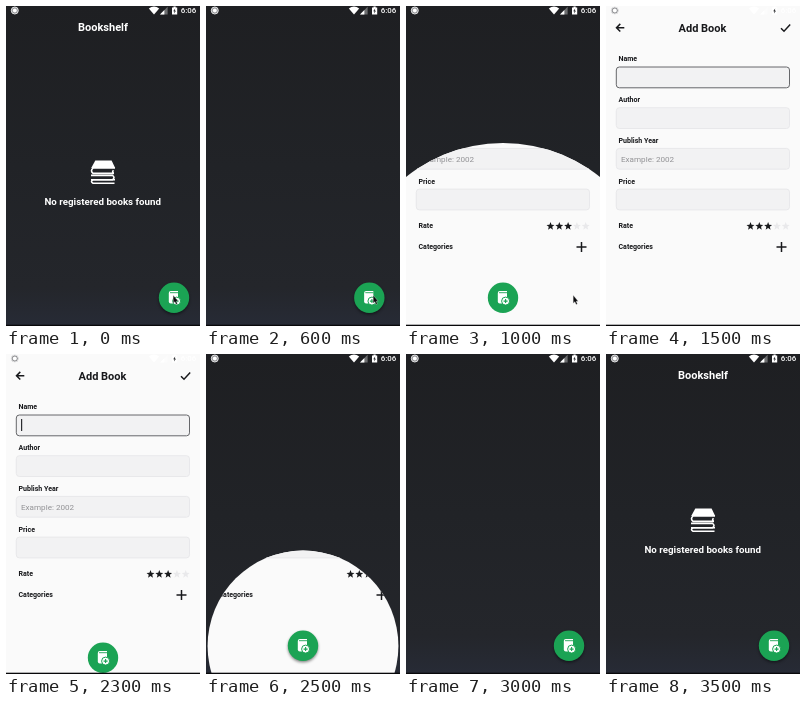
Recreate the animation shown at these times as an HTML page. Size 194 by 320 pixels, loop 3.8 s.

```html
<!DOCTYPE html>
<html lang="en">
<head>
<meta charset="utf-8">
<title>Bookshelf</title>
<style>
  html, body { margin: 0; width: 100%; height: 100%; overflow: hidden; background: #1f2023; }
  svg { display: block; width: 100vw; height: 100vh; }
  text { font-family: Roboto, "Noto Sans", sans-serif; }
  .title { font-size: 11px; font-weight: 700; text-anchor: middle; }
  .empty { font-size: 9.75px; font-weight: 700; text-anchor: middle; }
  .label { font-size: 7.05px; font-weight: 700; fill: #18191c; }
  .hint { font-size: 8.1px; fill: #929295; }
  .clock { font-size: 7.9px; font-weight: 500; fill: #fff; }
  .field { fill: #f2f2f3; stroke: #e5e5e7; stroke-width: .8; }
  .focus { stroke: #66676a; stroke-width: 1; }
  .line { fill: none; stroke: #18191c; stroke-width: 1.5; }
</style>
</head>
<body>
<svg viewBox="0 0 194 320" preserveAspectRatio="none">
  <defs>
    <linearGradient id="night" x2="0" y2="1">
      <stop offset="0" stop-color="#1e1f22"/>
      <stop offset=".5" stop-color="#212327"/>
      <stop offset=".88" stop-color="#24262b"/>
      <stop offset="1" stop-color="#272b36"/>
    </linearGradient>
    <filter id="blur" x="-50%" y="-50%" width="200%" height="200%">
      <feGaussianBlur stdDeviation="1.4"/>
    </filter>
    <clipPath id="reveal"><circle id="hole" cx="97" cy="292" r="0"/></clipPath>
  </defs>

  <rect width="194" height="320" fill="url(#night)"/>

  <g id="home" fill="#fff">
    <text class="title" x="97" y="25.3">Bookshelf</text>
    <path d="M89.3 154.5H105.6L109.2 162H85.2Z"/>
    <g fill="none" stroke="#fff" stroke-width="1.6">
      <path d="M109 162H87q-3 3 0 5.4H108"/>
      <path d="M107.5 164.2q-1.6 1.6 0 3.2"/>
      <path d="M85 169.4H106.5q3 2.2 0 4.4H85"/>
      <path d="M109 173.8H87q-3 1.8 0 3.4H108.5"/>
    </g>
    <text class="empty" x="96.7" y="199.3">No registered books found</text>
  </g>

  <g id="form" clip-path="url(#reveal)">
    <rect width="194" height="320" fill="#fafafa"/>
    <text class="title" x="96.5" y="25.7" fill="#18191c">Add Book</text>
    <path class="line" d="M18.3 21.7H10.8M14.3 17.9L10.5 21.7L14.3 25.5"/>
    <path class="line" d="M175 22.2L178 25.2L184.2 18.6"/>
    <g id="fields"></g>
    <text class="hint" x="15" y="155.8">Example: 2002</text>
    <text class="label" x="12.5" y="221.6">Rate</text>
    <g id="stars"></g>
    <text class="label" x="12.5" y="243.4">Categories</text>
    <path class="line" d="M170.5 241H180.5M175.5 236V246"/>
    <rect id="caret" x="15" y="65" width="1.2" height="12" fill="#2b2c2f"/>
  </g>

  <g id="fab">
    <circle id="shade" cy="1.6" r="15" fill="#000" opacity=".5" filter="url(#blur)"/>
    <circle r="15.2" fill="#1ba354"/>
    <path d="M-5.2 -4.8q0 -2 2 -2H4V5.8H-3.2q-2 0 -2 -2Z" fill="#fff"/>
    <path d="M-4 -5H4" stroke="#1ba354" stroke-width=".9"/>
    <circle cx="2.6" cy="3.4" r="4" fill="#fff" stroke="#1ba354" stroke-width="1"/>
    <path d="M.6 3.4H4.6M2.6 1.4V5.4" stroke="#1ba354" stroke-width="1.1"/>
  </g>

  <g fill="#fff">
    <circle cx="8.8" cy="4.5" r="3.5" fill="#8d8e91" stroke="#e4e4e5"/>
    <circle cx="8.8" cy="4.5" r="2" />
    <path d="M142.8 2.5Q148 -1.5 153.2 2.5L148 8.6Z"/>
    <path d="M154 8.5L161.6 .8V8.5Z" opacity=".35"/>
    <path d="M154 8.5L158.4 4V8.5Z"/>
    <path d="M166 1.5H167.5V.4H169.7V1.5H171.2V8.6H166Z"/>
    <path d="M169.2 2.4L167.2 5.2H168.5L168 7.6L170 4.7H168.8Z" fill="#1e1f22"/>
    <text class="clock" x="174.8" y="7.3">6:06</text>
  </g>

  <path id="cursor" d="M167.2 289.2V297.2L168.9 295.7L170.1 298.6L171.4 298L170.2 295.2H172.2Z"
        fill="#08080a" stroke="#e8e8e8" stroke-width=".35"/>
  <rect y="318.7" width="194" height="1.3" fill="#08080a"/>
</svg>
<script>
  const LOOP = 3800, STEP = 100;
  const $ = id => document.getElementById(id);
  const set = (id, name, value) => $(id).setAttribute(name, value);
  const span = (t, from, to) => Math.min(1, Math.max(0, (t - from) / (to - from)));
  const mix = (a, b, p) => a + (b - a) * p;
  const easeInOut = p => p < .5 ? 16 * p ** 5 : 1 - (2 - 2 * p) ** 5 / 2;
  const easeOut = p => 1 - (1 - p) ** 2.9;

  $('fields').innerHTML = ['Name', 'Author', 'Publish Year', 'Price'].map((name, i) => {
    const y = 55.4 + i * 40.7;
    return `<text class="label" x="12.5" y="${y}">${name}</text>
      <rect class="field ${i ? '' : 'focus'}" x="10.3" y="${y + 5.6}" width="173.2" height="20.8" rx="3"/>`;
  }).join('');

  function star(cx, cy, r) {
    const points = Array.from({ length: 10 }, (_, i) => {
      const a = i * Math.PI / 5, d = i % 2 ? r * .43 : r;
      return `${cx + d * Math.sin(a)},${cy - d * Math.cos(a)}`;
    });
    return points.join(' ');
  }

  $('stars').innerHTML = [0, 1, 2, 3, 4].map(i =>
    `<polygon points="${star(144.5 + i * 8.8, 220.3, 4.2)}" fill="${i < 3 ? '#18191c' : '#e9e9eb'}"/>`
  ).join('');

  function draw(t) {
    const leaving = t < 1900;
    const fade = leaving ? 1 - span(t, 0, 500) : span(t, 3000, 3200);
    const radius = leaving
      ? 310 * span(t, 800, 1200)
      : 310 * (1 - span(t, 2300, 2700)) ** 1.7;
    const x = leaving
      ? mix(168, 97, easeInOut(span(t, 500, 800)))
      : mix(97, 168, easeOut(span(t, 2700, 3200)));
    const drop = leaving ? span(t, 1200, 1500) ** 2 : (1 - span(t, 2200, 2400)) ** 2;
    const shade = leaving ? 1 - span(t, 800, 1000) : span(t, 2300, 2500);

    set('home', 'opacity', fade);
    set('hole', 'r', radius);
    set('form', 'visibility', radius > 0 ? 'visible' : 'hidden');
    set('fab', 'transform', `translate(${x} ${291.7 + 48 * drop})`);
    set('shade', 'opacity', .5 * shade);
    set('cursor', 'visibility', t < 1300 ? 'visible' : 'hidden');
    const caretOn = (t >= 1300 && t < 1500) || (t >= 1900 && t < 2400);
    set('caret', 'opacity', caretOn ? 1 : 0);
  }

  const start = performance.now();
  function tick() {
    const t = (performance.now() - start) % LOOP;
    draw(Math.floor(t / STEP) * STEP);
    requestAnimationFrame(tick);
  }
  tick();
</script>
</body>
</html>
```
